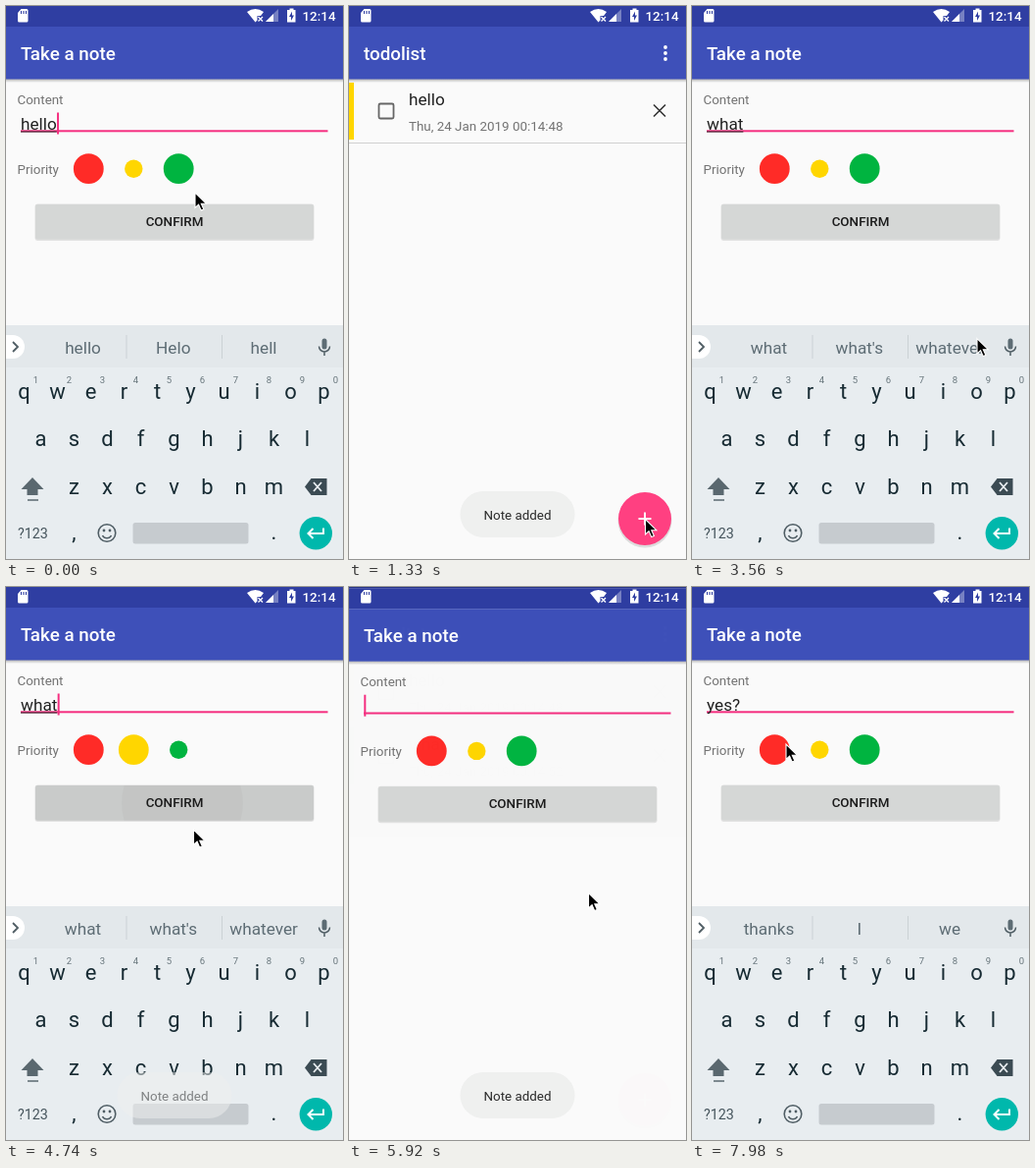
An HTML page for the animation above (8 s loop, 344 by 563 pixels).

```html
<!DOCTYPE html>
<html lang="en">
<head>
<meta charset="utf-8">
<title>Take a note</title>
<style>
  html, body { margin: 0; width: 100%; height: 100%; overflow: hidden; background: #000; }
  svg { display: block; width: 100vw; height: 100vh; font-family: Roboto, sans-serif; }
  .title { font-size: 18.8px; font-weight: 500; fill: #fff; }
  .small { font-size: 13.4px; fill: #737373; }
  .body { font-size: 17.2px; fill: #212121; }
  .bold { font-weight: 500; }
  .key { font-size: 22px; fill: #172b33; text-anchor: middle; }
  .hint { font-size: 9.5px; fill: #66747a; text-anchor: middle; }
  .guess { font-size: 17.2px; fill: #5d6c74; text-anchor: middle; }
  .line { fill: none; stroke: #4f5d64; stroke-width: 1.8; }
</style>
</head>
<body>
<svg viewBox="0 0 344 563">
  <defs>
    <linearGradient id="shade" x2="0" y2="1">
      <stop offset="0" stop-opacity=".3"/><stop offset="1" stop-opacity="0"/>
    </linearGradient>
    <clipPath id="buttonClip"><rect x="30" y="202" width="284" height="36" rx="2"/></clipPath>
    <g id="page">
      <rect width="344" height="620" fill="#fafafa"/>
      <rect y="74" width="344" height="4" fill="url(#shade)"/>
      <rect width="344" height="21" fill="#2f3ea2"/>
      <rect y="21" width="344" height="53.5" fill="#3e50b9"/>
    </g>
  </defs>
  <rect width="344" height="563"/>

  <g id="list">
    <use href="#page"/>
    <text class="title" x="15" y="55">todolist</text>
    <g fill="#fff"><circle cx="323" cy="42" r="1.9"/><circle cx="323" cy="48" r="1.9"/><circle cx="323" cy="54" r="1.9"/></g>
    <g id="rows"></g>
    <circle cx="302" cy="524" r="27.5" opacity=".12"/>
    <circle cx="302" cy="522" r="27" fill="#ff4081"/>
    <path d="M295.500 522h13M302 515.500v13" stroke="#fff" stroke-width="2"/>
  </g>

  <g id="note">
    <use href="#page"/>
    <text class="title" x="15" y="55">Take a note</text>
    <text class="small" x="11.500" y="100">Content</text>
    <rect x="15" y="126.300" width="313.500" height="2" fill="#f52f80"/>
    <text id="entry" class="body" x="15" y="126"></text>
    <rect id="underline" x="15" y="127.500" height="1" fill="#212121"/>
    <rect id="caret" y="108.500" width="2" height="22" fill="#f52f80"/>
    <text class="small" x="11.500" y="171">Priority</text>
    <circle cx="84.300" cy="165.700" r="15.400" fill="#ff2b27"/>
    <circle id="yellow" cx="130.300" cy="165.700" fill="#ffd600"/>
    <circle id="green" cx="176.200" cy="165.700" fill="#00b440"/>
    <rect x="29.500" y="201.500" width="285" height="37.500" rx="3" opacity=".1"/>
    <rect x="30" y="202" width="284" height="35.500" rx="2" fill="#d5d7d6"/>
    <g id="ripple" clip-path="url(#buttonClip)">
      <rect x="30" y="202" width="284" height="36" opacity=".055"/>
      <circle id="wave" cy="220" opacity=".028"/>
    </g>
    <text class="small bold" x="172" y="224" text-anchor="middle" style="fill:#1c1c1c">CONFIRM</text>
  </g>

  <g id="keyboard">
    <rect y="325" width="344" height="240" fill="#e8edf0"/>
    <rect y="325" width="344" height="43" fill="#e3e8eb"/>
    <path d="M123 335v24M220.500 335v24" stroke="#cbd1d5"/>
    <g id="guesses"></g>
    <path d="M0 335h7a12 12 0 0 1 0 24H0z" fill="#fff"/>
    <path class="line" d="M7 342l5 5-5 5"/>
    <rect x="322.500" y="338.500" width="5" height="11" rx="2.500" fill="#5d6c74"/>
    <path class="line" d="M319.500 346.500a5.500 5.500 0 0 0 11 0M325 352v4" style="stroke-width:1.500"/>
    <g id="keys"></g>
    <path d="M27 480l11.500 12h-6v6h-11v-6h-6z" fill="#5a686f"/>
    <path d="M22 503h11" stroke="#5a686f" stroke-width="1.500"/>
    <path d="M305 489.500l6.500-8.500h16v17h-16z" fill="#3b4b53"/>
    <path d="M314 485l8 9m0-9l-8 9" stroke="#e8edf0" stroke-width="1.800"/>
    <text class="small" x="12" y="542" style="fill:#45545c;font-size:14.300px">?123</text>
    <circle class="line" cx="103" cy="536.500" r="8.800" style="stroke-width:1.600"/>
    <g fill="#4f5d64"><circle cx="100" cy="534" r="1.400"/><circle cx="106" cy="534" r="1.400"/></g>
    <path class="line" d="M98.500 539a5 5 0 0 0 9 0" style="stroke-width:1.500"/>
    <rect x="129.500" y="526" width="118" height="21.500" rx="2.500" fill="#c6cbcf"/>
    <circle cx="316.300" cy="536.800" r="16.700" fill="#00b8ac"/>
    <path d="M324 531.500v5.500h-15.500m5-5l-5 5 5 5" fill="none" stroke="#fff" stroke-width="2"/>
  </g>

  <g id="toast">
    <rect x="113.500" y="494" width="117" height="47" rx="23.500" fill="#eeefee" opacity=".92"/>
    <text class="small" x="172" y="523" text-anchor="middle" style="fill:#2b2b2b">Note added</text>
  </g>

  <g fill="#fff">
    <path d="M15.500 3H21q1.500 0 1.500 1.500v10.500q0 1.500-1.500 1.500h-7.500q-1.500 0-1.500-1.500V7z"/>
    <path d="M15.500 5v3M18 5v3M20.500 5v3" stroke="#2f3ea2" stroke-width="1.100"/>
    <path d="M246 6q8.500-6 17 0l-3 4h-3.500v4.500l-2 2z"/>
    <path d="M257.500 11l4.500 4.500m0-4.500l-4.500 4.500" stroke="#fff" stroke-width="1.300"/>
    <path d="M278 3v13h-13z" opacity=".35"/>
    <path d="M273 8v8h-8z"/>
    <path d="M289.500 2.500h4v1.500h2v12.500h-8.500V4h2.500z"/>
    <path d="M292 5.500l-3 5.500h2v4l3-5.500h-2z" fill="#2f3ea2"/>
    <text class="small bold" x="302.500" y="14.500" style="fill:#fff">12:14</text>
  </g>

  <path id="mouse" d="M0 0v15.500l3.600-3.400 2.600 6 2.700-1.200-2.600-5.700h5z" stroke="#fff" stroke-width="1.100"/>
</svg>

<script>
const LOOP = 8000, TICK = 147.8, BLINK = 1000 / TICK;
const el = id => document.getElementById(id);
const set = (id, attrs) => Object.entries(attrs).forEach(([name, v]) => el(id).setAttribute(name, v));
const ramp = (tick, start, length) => Math.max(0, Math.min(1, (tick - start) / length));

// Each visit to the note page; its moments are counted in ticks.
const visits = [
  { word: 'hello', open: -20, type: -20, blink: -1, confirm: 4, color: '#ffd600', seconds: 48 },
  { word: 'what', open: 10.5, type: 17, blink: 25, pick: 27, confirm: 32, color: '#00b440', seconds: 52 },
  { word: 'yes?', open: 38, type: 44, blink: 49 }
];
// The pointer rests at x, y from one tick until another.
const stops = [
  { from: 0, until: 1, x: 193, y: 190 }, { from: 4, until: 4, x: 191, y: 228 },
  { from: 6, until: 6, x: 279.5, y: 537.5 }, { from: 8, until: 22, x: 302.5, y: 522.5 },
  { from: 24, until: 24, x: 291, y: 338.5 }, { from: 27, until: 28, x: 176, y: 168 },
  { from: 32, until: 32, x: 191.5, y: 247 }, { from: 36, until: 38, x: 302.5, y: 522.5 },
  { from: 40, until: 40, x: 244.5, y: 311.5 }, { from: 41, until: 50, x: 191, y: 248 },
  { from: 54, until: 54, x: 96, y: 160 }
];
const suggestions = {
  hello: 'hello Helo hell', w: 'we w with', wh: 'what who why', wha: 'what wha whatever',
  what: "what what's whatever", y: 'you y yes', ye: 'yes ye yeah', yes: 'yes yeah yet'
};

const label = (kind, x, y, text) => `<text class="${kind}" x="${x}" y="${y}">${text}</text>`;
const keyRow = (kind, letters, x, y) => [...letters].map((c, i) => label(kind, x + 34 * i, y, c)).join('');
const row = ({ word, color, seconds }, i) => `<g transform="translate(0 ${75 + 65 * i})">
  <rect y="3" width="5" height="58" fill="${color}"/>
  <rect x="30.500" y="24.500" width="15" height="15" rx="1.500" class="line" style="stroke:#666"/>
  ${label('body', 61, 25.5, word)}${label('small', 61, 52, 'Thu, 24 Jan 2019 00:14:' + seconds)}
  <path d="M311 25.500l12 12m0-12l-12 12" stroke="#333" stroke-width="1.600"/>
  <path d="M0 64.500h344" stroke="#d0d0d0"/></g>`;

el('rows').innerHTML = visits.filter(v => v.confirm).map(row).join('');
el('keys').innerHTML = keyRow('key', 'qwertyuiop', 18.5, 400) + keyRow('key', 'asdfghjkl', 35.5, 448)
  + keyRow('key', 'zxcvbnm', 69.5, 496.5) + keyRow('key', ',', 69.5, 543) + keyRow('key', '.', 273.5, 543)
  + keyRow('hint', '1234567890', 30.5, 384);

// Windows ease in from below and accelerate away.
function slide(id, entered, left, rise, fall, faded) {
  const y = rise * (1 - entered) ** 2 + fall * left ** 2;
  const opacity = (1 - (1 - entered) ** 3) * (1 - left) ** faded;
  set(id, { transform: `translate(0 ${y})`, opacity });
  return opacity;
}

function showEntry(tick, { word, type, open, blink }) {
  const text = word.slice(0, Math.max(0, tick - type - 1));
  const entry = el('entry');
  entry.textContent = text;
  const width = text ? entry.getComputedTextLength() : 0;
  const blinkStart = tick < blink ? open + 1 : blink;
  const phase = (tick - blinkStart + BLINK) / BLINK % 1;
  set('underline', { width: text.endsWith('?') ? 0 : width });
  set('caret', { x: 15.3 + width, opacity: phase < .5 ? 1 : 0 });
  el('guesses').innerHTML = (suggestions[text] || 'thanks I we').split(' ')
    .map((guess, i) => label('guess', 78.5 + 92.3 * i, 353.5, guess)).join('');
}

function mouseAt(tick) {
  const next = stops.findIndex(stop => stop.until >= tick);
  const b = stops.at(next), a = stops[Math.max(0, next - 1)];
  const u = ramp(tick, a.until, b.from - a.until || 1);
  return next < 1 ? [b.x, b.y] : [a.x + (b.x - a.x) * u, a.y + (b.y - a.y) * u];
}

function draw(now) {
  const tick = Math.floor((now % LOOP + 4) / TICK);
  const visit = visits.findLast(v => v.open <= tick);
  const { open, type, confirm = Infinity, pick = Infinity } = visit;
  const left = ramp(tick, confirm, 4);
  const shown = slide('note', ramp(tick, open, 2.5), left, 30, 40, 1);
  slide('keyboard', ramp(tick, type, 2), left, 124, 124, 1.4);
  set('list', { opacity: 1 - .16 * shown });
  [...el('rows').children].forEach((item, i) =>
    item.setAttribute('opacity', i === 0 || tick >= visits[i].confirm ? 1 : 0));
  showEntry(tick, visit);

  const picked = ramp(tick, pick - 1, 2);
  set('yellow', { r: 9.2 + 6.2 * picked });
  set('green', { r: 15.4 - 6.2 * picked });

  const pressed = tick >= confirm;
  set('ripple', { opacity: pressed ? 1 - left * .5 : 0 });
  set('wave', { cx: 180 - 18 * left, r: 62 + 7 * left });

  const added = visits.findLast(v => v.confirm <= tick);
  const age = added ? tick - added.confirm : Infinity;
  set('toast', { opacity: Math.min(1, .55 + .15 * age) * (1 - ramp(age, 13, 2)) });
  set('mouse', { transform: `translate(${mouseAt(tick)})` });
}

function frame(now) {
  draw(now);
  requestAnimationFrame(frame);
}
draw(0);
requestAnimationFrame(frame);
</script>
</body>
</html>
```
